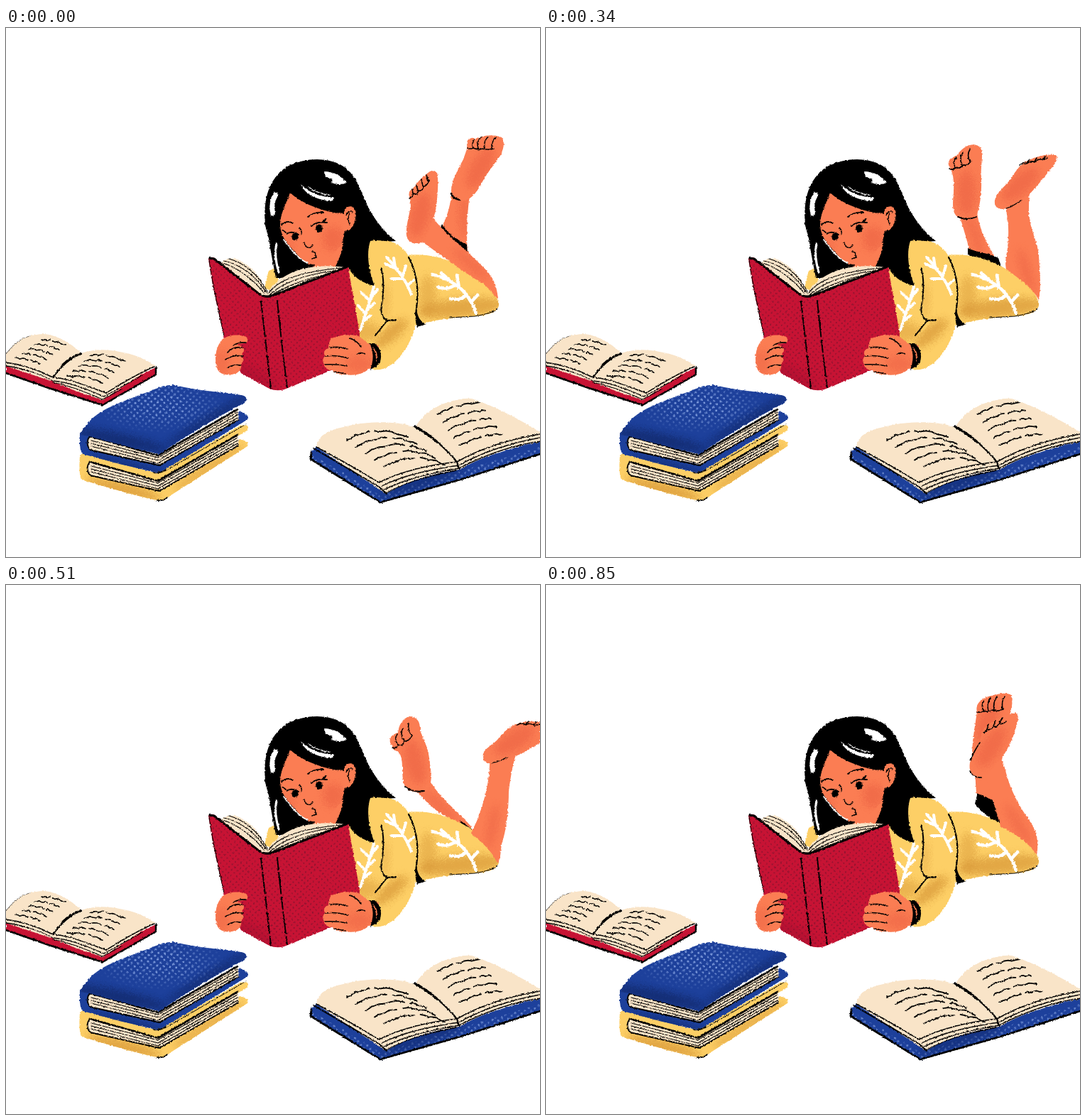
Animation of 752 by 745 pixels, one loop 1020 ms. Source, as an HTML page:

```html
<!DOCTYPE html>
<html lang="en">
<head>
<meta charset="utf-8">
<title>Reading</title>
<style>
html, body { margin: 0; width: 100%; height: 100%; overflow: hidden; background: #fff; }
svg { display: block; width: 752px; height: 745px; }
</style>
</head>
<body>
<svg id="stage" viewBox="0 0 752 745" xmlns="http://www.w3.org/2000/svg"></svg>
<script>
const SKIN = '#fb7d53', BLUSH = '#e95f42', RED = '#c71334', BLUE = '#1d409b',
  YELLOW = '#fdcf66', OCHRE = '#d99a3a', CREAM = '#f9e4c8', INK = '#000', WHITE = '#fff';
let clips = 0;

const fill = (d, c) => `<path d="${d}" fill="${c}"/>`;
const line = (d, w = 2, c = INK) =>
  `<path d="${d}" fill="none" stroke="${c}" stroke-width="${w}" stroke-linecap="round" stroke-linejoin="round"/>`;
const soft = (x, y, rx, ry, c, o = .6, turn = 0) =>
  `<ellipse cx="${x}" cy="${y}" rx="${rx}" ry="${ry}" fill="${c}" opacity="${o}" transform="rotate(${turn} ${x} ${y})" filter="url(#spray)"/>`;
// A flat shape with shading kept inside its outline.
const shape = (d, c, inner) => {
  const id = 'c' + clips++;
  return `<clipPath id="${id}"><path d="${d}"/></clipPath>${fill(d, c)}<g clip-path="url(#${id})">${inner}</g>`;
};
const dots = (id, size, r, c) =>
  `<pattern id="${id}" width="${size}" height="${size}" patternUnits="userSpaceOnUse" patternTransform="rotate(6)">
  <g fill="${c}"><circle cx="${size / 4}" cy="${size / 4}" r="${r}"/><circle cx="${size * .75}" cy="${size * .75}" r="${r}"/></g></pattern>`;
// Rows of handwritten dashes that follow the bulge of a page.
const rows = (n, x, y, sx, sy, dx, dy, bow, w) => {
  let d = '';
  for (let i = 0; i < n; i++) {
    const cut = .36 + .14 * (i % 3);
    for (const [s, e] of [[0, cut], [cut + .1, 1]]) {
      for (let k = 0; k <= 6; k++) {
        const t = s + (e - s) * k / 6;
        const px = x + sx * i + dx * t;
        const py = y + sy * i + dy * t - bow * 4 * t * (1 - t) + Math.sin(k * 1.9 + i);
        d += `${k ? 'L' : 'M'}${px.toFixed(1)},${py.toFixed(1)}`;
      }
    }
  }
  return line(d, w);
};

const noise = f => `<feTurbulence type="fractalNoise" baseFrequency="${f}" numOctaves="2" seed="4" result="n"/>`;
const defs = `<defs>
<filter id="spray" x="-50%" y="-50%" width="200%" height="200%" color-interpolation-filters="sRGB">
  <feGaussianBlur stdDeviation="5" result="b"/>${noise(.7)}
  <feDisplacementMap in="b" in2="n" scale="22" xChannelSelector="R" yChannelSelector="G"/></filter>
<filter id="pencil" filterUnits="userSpaceOnUse" x="-10" y="-10" width="772" height="765" color-interpolation-filters="sRGB">
  ${noise(.35)}<feDisplacementMap in="SourceGraphic" in2="n" scale="3" xChannelSelector="R" yChannelSelector="G"/></filter>
${dots('redDots', 8, 1.15, '#93122f')}${dots('blueDots', 9, 1.5, '#7e9bdc')}
<radialGradient id="fade"><stop offset=".35" stop-color="#fff"/><stop offset="1" stop-color="#000"/></radialGradient>
<mask id="dotFade"><ellipse cx="215" cy="531" rx="95" ry="40" fill="url(#fade)"/></mask></defs>`;

function smallBook() {
  const left = 'M0,459C10,446 20,437 33,434C45,431 55,429 68,434C84,440 96,448 106,458C90,465 76,478 66,492C50,484 25,474 0,471Z';
  const right = 'M106,458C122,452 142,452 160,456C178,459 196,465 210,476C188,485 164,500 141,514C115,505 92,494 66,491C76,478 90,465 106,458Z';
  return fill('M0,471L66,492L141,512L211,478L211,489L136,531L120,527L0,486Z', RED) +
    fill('M0,465L66,480L141,500L209,476L136,524L100,512L66,498L0,476Z', CREAM) +
    line('M0,486L60,507L136,531L211,488V478', 2.5) +
    fill(left, CREAM) + fill(right, CREAM) +
    line('M0,471C25,474 50,484 66,492C92,494 115,505 141,514C164,500 188,485 209,477', 1.5) +
    line('M0,476C24,479 50,488 66,497C92,499 114,509 138,519L192,489', 1.3) +
    line('M66,499C92,504 112,513 136,523L162,509', 1.2) +
    line('M0,459C10,446 20,437 33,434', .6) +
    line('M106,458C90,465 76,478 66,492', 2.4) + line('M105,459Q92,463 80,474', 3) +
    rows(5, 50, 439, -9, 6.5, 34, 8, 2, 1.5) + rows(5, 118, 461, -8, 7.5, 50, 9, 4, 1.5);
}

function stack() {
  const top = 'M104,573C113,556 124,546 140,537C160,527 185,518 204,511C218,505 228,502 239,503C268,511 302,512 331,517C338,518 341,522 336,528C300,546 258,572 216,600C180,592 145,583 118,575Z';
  const under = 'M104,570C104,584 103,594 108,600L160,614L207,625Q216,627 222,623L341,551Q342,543 329,540L214,606L118,572Z';
  const gold = 'M104,602C103,616 103,628 106,636C140,646 180,658 212,665Q220,666 226,662L340,589Q343,582 329,579L214,642L118,608Z';
  const pages = y => {
    const d = `M118,${574 + y}L214,${602 + y}L326,${537 + y}L328,${552 + y}L218,${615 + y}L119,${594 + y}Q110,${584 + y} 118,${574 + y}Z`;
    return fill(d, CREAM) +
      line(`M118,${575 + y}Q111,${584 + y} 118,${594 + y}L216,${616 + y}L327,${552 + y}`, 2) +
      line([5, 9, 13].map(k => `M120,${576 + y + k}L214,${600 + y + k}L326,${536 + y + k}`).join(''), 1.1) +
      line(`M118,${575 + y}L165,${588 + y}L214,${602 + y}L326,${537 + y}`, 2.8);
  };
  return shape(gold, YELLOW, soft(165, 650, 55, 9, OCHRE, .8, 14) + soft(285, 620, 60, 7, OCHRE, .6, -32)) +
    fill('M104,605Q103,598 112,600L212,627L330,560Q342,557 341,566L215,641L106,616Z', YELLOW) +
    pages(36) + line('M224,624L338,558', 1) +
    shape(under, BLUE, soft(175, 620, 60, 7, '#112a70', .7, 14)) + pages(0) +
    shape(top, BLUE, soft(160, 580, 70, 9, '#12296c', .8, 12) + soft(285, 553, 70, 7, '#12296c', .7, -31) +
      `<rect x="100" y="480" width="245" height="110" fill="url(#blueDots)" mask="url(#dotFade)"/>`) +
    line('M207,626Q217,628 225,622M213,665Q220,667 227,661', 1.6);
}

function bigBook() {
  const cover = 'M430,596L437,590L533,646L640,615L752,580L752,601L640,636L527,669L429,608Z';
  const left = 'M437,590C440,574 452,567 475,562C505,554 545,552 577,562C599,574 619,592 635,611C597,615 560,623 525,640C496,622 465,605 437,590Z';
  const right = 'M577,561C586,545 603,533 622,527C635,523 647,521 656,522C690,533 722,551 752,569V572C710,579 670,591 636,611C617,590 599,574 577,561Z';
  return shape(cover, BLUE, '<path d="M430,600L527,658L752,590V605L527,672L425,610Z" fill="url(#blueDots)" opacity=".75"/>' +
      soft(585, 640, 65, 7, '#112a70', .7, -18)) +
    line('M430,598L429,607L527,668L640,636L752,600', 2.8) +
    fill('M437,590L525,620L635,595L752,568V583C712,590 676,601 638,622C598,628 568,637 535,656Z', CREAM) +
    fill(left, CREAM) + fill(right, CREAM) +
    line('M437,590C465,605 496,622 525,640C560,623 597,615 635,611C670,591 710,579 752,572', 1.6) +
    line('M529,645C562,629 598,622 637,616C672,597 712,584 752,577', 1.3) +
    line('M533,650C565,634 600,626 638,620C675,601 712,588 752,582', 1.3) +
    line('M535,655C566,638 600,630 634,623', 1.3) +
    line('M433,592L525,646L536,656', 2) +
    line('M577,562C599,574 619,592 635,611L638,621', 2.4) + line('M576,561Q593,571 606,582', 3.4) +
    rows(5, 480, 580, 13, 9.5, 86, -3, 11, 1.8) +
    rows(5, 607, 544, 8, 11, 60, -16, 4, 1.8);
}

const foot = (d, x, y, turn) => shape(d, SKIN, soft(x, y, 13, 32, BLUSH, .55, turn));
const calf = (d, x, y, turn) => shape(d, SKIN, soft(x, y, 7, 32, BLUSH, .45, turn));
const toes = d => line(d, 1.6);

// Each pose: far leg (behind the dress) and near leg (over it).
const poses = [
  {
    far: calf('M628,232C625,254 620,268 614,280L650,323C649,298 648,268 653,236Z', 645, 262, 0) +
      fill('M614,276C622,289 636,299 649,305L650,321C635,312 620,298 611,284Z', INK) +
      foot('M627,232C626,218 636,200 644,185C647,176 650,170 649,163C649,156 655,153 661,156C672,150 690,150 698,154C703,160 701,170 696,180C685,195 676,206 668,222C660,236 650,246 638,242Q629,240 627,232Z', 668, 197, 30) +
      toes('M650,169Q654,171 658,169Q665,172 671,170Q680,172 687,170M658,169Q655,162 660,157M665,169Q662,160 669,154M674,169Q672,160 679,153M684,169Q684,158 690,154') +
      line('M627,233Q630,241 639,242', 2.6),
    near: calf('M598,262C612,285 640,305 660,325C678,343 690,350 693,381C688,380 684,370 672,360C650,348 620,325 586,301Z', 655, 332, -48) +
      foot('M568,237C566,230 570,228 575,224C580,215 590,207 597,202C604,199 609,204 608,212C609,225 607,240 606,252C603,268 597,283 590,298C585,306 570,306 565,296C561,285 568,265 570,250Z', 583, 263, 14) +
      toes('M568,240Q572,238 574,233Q579,236 581,229Q586,231 588,223Q593,223 596,214M573,233L572,227M580,229L578,222M587,223L585,213M595,216L592,207')
  },
  {
    far: fill('M605,272L607,296L604,308C612,318 625,330 641,339C634,315 624,290 618,270Z', INK) +
      fill('M604,262L606,293L632,304L622,262Z', SKIN) +
      foot('M607,178C604,168 612,162 620,158C632,154 648,150 655,155C658,162 656,172 654,180L640,208L618,238L600,242C600,220 604,200 607,178Z', 622, 192, 20) +
      toes('M608,179Q613,180 617,177Q623,180 629,176Q636,179 643,175M616,177Q612,169 617,163M623,177Q620,167 626,159M631,176Q629,166 635,157M643,175Q641,163 646,157'),
    near: calf('M618,266C625,290 633,315 640,340C660,350 680,362 691,381C695,362 690,345 683,335C665,310 655,290 648,265C645,252 642,246 640,236Z', 665, 337, -32) +
      foot('M660,180C667,182 665,190 662,200C657,220 648,235 640,246C630,255 625,268 612,272C600,272 595,262 597,250C603,232 611,224 613,210C618,195 640,185 660,180Z', 627, 228, 32) +
      toes('M598,247Q602,235 611,222M616,208Q620,207 621,203Q627,205 630,199Q635,201 638,195Q643,197 648,192M621,203L623,196M630,199L633,191M638,195L643,187') +
      line('M597,262Q602,272 613,271', 1.6)
  },
  {
    far: calf('M582,262C588,285 594,300 596,314L642,342C630,315 612,295 607,260Z', 604, 291, -18) +
      fill('M594,310C606,316 625,317 637,324L643,341C625,337 605,327 594,319Z', INK) +
      foot('M567,193C565,185 572,182 578,180C584,172 590,165 602,164C612,165 615,172 614,180C614,190 612,200 613,212C614,235 610,255 606,265C598,272 585,270 579,266C571,258 573,245 574,232C575,215 573,205 570,200Z', 592, 232, 0) +
      toes('M568,198Q574,201 577,196Q583,199 587,193Q594,194 598,188M576,196Q572,188 578,182M586,193Q581,183 587,176M597,188Q592,179 597,171') +
      line('M580,266Q592,272 606,266', 1.8),
    near: calf('M646,248C652,270 652,290 650,310C648,322 646,330 648,340C665,352 685,365 694,383C698,360 695,345 694,320C692,300 682,285 680,262C680,250 680,245 681,228Z', 676, 342, -18) +
      foot('M632,243C634,232 645,225 655,212C662,200 668,192 678,187C690,180 708,177 718,179C722,183 718,190 712,197C702,210 692,222 680,235C668,243 655,250 645,255C635,256 631,250 632,243Z', 668, 220, 48) +
      toes('M667,193Q672,189 677,191Q683,186 688,189Q694,183 700,186L706,183M677,190L681,185M688,188L691,183M700,185L703,181') +
      line('M648,254Q658,251 670,242', 1.2)
  },
  {
    far: calf('M577,288C590,305 605,318 618,325L656,350L656,341C635,318 612,300 598,278Z', 612, 312, -48) +
      fill('M639,331L656,344L657,353L646,347Z', INK) +
      foot('M541,222C539,214 545,210 552,208C553,198 558,188 568,185C578,185 584,192 583,205C590,220 596,235 597,252C600,270 600,285 590,291C578,294 564,290 560,280C557,265 559,255 557,245C556,238 552,234 546,232Z', 576, 250, -13) +
      toes('M544,229Q550,231 552,225Q559,228 561,220Q568,220 572,212M552,225Q546,217 551,210M561,220Q554,210 559,202M572,212Q565,205 567,195') +
      line('M562,284Q574,293 589,290', 1.8),
    near: calf('M681,246C682,275 672,310 664,330C660,340 656,345 655,350C670,362 685,375 692,392C697,385 696,378 698,365C705,345 708,315 708,290C711,268 714,250 719,236Z', 685, 340, 10) +
      foot('M672,242C670,232 682,228 692,218C700,208 708,200 718,196C732,190 745,193 752,193V222C742,228 732,235 720,240C708,246 695,252 682,252C675,250 672,248 672,242Z', 716, 219, 58) +
      toes('M720,197Q727,193 732,197Q738,193 744,198L752,196M732,196L736,192M743,197L747,193') +
      line('M684,251Q696,248 706,243', 1.2)
  }
];

function dress() {
  const skirt = 'M562,320C590,317 615,322 640,335C662,347 688,362 694,388C694,397 686,402 672,405C640,407 610,409 585,417L574,420Z';
  return shape(skirt, YELLOW, soft(640, 394, 62, 13, OCHRE, .75, -5) + soft(594, 378, 12, 30, OCHRE, .5)) +
    line('M692,396Q684,402 660,406L625,408', 1) +
    line('M600,347C615,350 640,362 650,378C656,387 660,394 662,402M624,355L613,345M638,366L635,348M632,362C624,368 616,367 608,365M648,376C640,384 634,383 626,381M655,386L664,376', 4.6, WHITE);
}

function body() {
  const chest = 'M478,332L500,300L518,296L575,330L580,417L540,430L515,450L494,440L480,335Z';
  const arm = 'M512,298C532,294 552,302 562,314C576,332 580,360 579,392C580,420 570,446 552,466C540,478 528,484 515,480L511,446C522,436 535,424 541,414C531,410 527,400 529,388C530,370 530,350 526,335C520,325 514,314 512,298Z';
  return fill('M386,335L370,342L364,366L380,374Z', YELLOW) +
    shape(chest, YELLOW, soft(505, 428, 24, 14, OCHRE, .5)) +
    line('M518,364C514,382 506,402 499,426M514,380L523,368M512,384L500,372M508,398L518,388M506,402L496,391M502,414L513,405', 4, WHITE) +
    shape(arm, YELLOW, soft(542, 430, 30, 10, OCHRE, .75, -40) + soft(534, 385, 6, 25, OCHRE, .35)) +
    line('M528,338C533,354 532,372 529,390Q526,406 537,412L549,411M536,413L520,433', 2) +
    line('M567,323C577,342 581,362 579,386L577,404', 2.2) +
    fill('M578,396C580,408 584,414 592,417L579,421C576,414 576,404 578,396Z', INK) +
    line('M536,323C547,334 562,352 571,375M548,337L546,324M558,352L563,335M549,339L534,332M558,353L543,353M565,363L574,355', 4, WHITE);
}

function head() {
  const hair = 'M365,278C362,240 370,212 396,195C420,183 448,182 468,191C490,201 498,224 505,241C514,264 530,285 549,300C537,302 524,297 513,300C507,318 511,342 519,363C506,361 489,352 482,337L470,335L430,352L380,352C376,330 372,312 370,296Z';
  const face = 'M400,232C394,248 386,262 386,278C387,291 393,300 402,310C411,321 421,332 432,333C446,332 459,322 469,309C474,302 477,292 477,280L476,262C453,260 420,250 400,232Z';
  return fill(hair, INK) +
    fill('M446,320L474,302L472,346L432,350L434,332Z', SKIN) +
    fill('M476,300L479,338L462,340C470,324 474,312 476,300Z', INK) +
    shape(face, SKIN, soft(461, 297, 15, 17, BLUSH, .55) + soft(399, 306, 8, 9, BLUSH, .35)) +
    line('M391,298C400,311 412,326 425,331', 1.8, WHITE) +
    fill('M476,259C478,250 489,248 492,257C494,267 490,280 483,285L475,286Z', SKIN) +
    line('M479,263Q484,255 488,259M484,261Q480,270 484,276', 1.5) +
    line('M388,277Q396,270 404,275M425,266Q435,258 447,260', 1.8) +
    line('M395,290Q402,285 412,291M394,288L390,285M430,279Q438,272 452,274M446,273L451,269', 1.9) +
    '<ellipse cx="407" cy="294" rx="4.6" ry="5.2"/><ellipse cx="441" cy="282" rx="4.8" ry="5.6"/>' +
    line('M413,281Q417,285 416,290M420,302Q421,309 426,309Q431,310 432,305', 1.5) +
    line('M431,315Q438,316 435,320Q440,323 431,325', 1.6) +
    fill('M378,231C371,240 370,253 373,264Q378,266 379,260C377,250 379,242 384,235Z', WHITE) +
    fill('M448,202C460,202 472,207 480,218Q470,222 457,218L460,214L450,209Z', WHITE) +
    fill('M415,220C426,232 444,238 462,239Q462,245 452,243C436,241 421,234 415,220Z', WHITE) +
    line('M381,304C378,316 380,330 384,344', 3.2, WHITE) +
    line('M426,224Q440,234 456,235', 1.3, WHITE);
}

function readingBook() {
  const cover = 'M285,325Q287,321 294,324L358,374Q365,379 374,377L482,335C485,360 494,400 498,433C490,452 474,470 458,482L392,509Q381,512 371,508L331,486L308,440C300,402 290,364 285,325Z';
  return fill('M303,331C307,325 317,323 326,326C345,334 361,352 368,373C378,357 396,345 418,339C435,335 458,334 477,337L374,379L355,374Z', CREAM) +
    line('M304,331C326,336 350,356 364,374M307,328C332,333 354,352 367,373M314,325C336,331 356,348 368,371', 1.2) +
    line('M369,374C382,356 410,344 470,338M371,376C388,360 415,348 462,342M372,377C392,366 416,354 450,348', 1.2) +
    shape(cover, RED, `<path d="${cover}" fill="url(#redDots)"/>` + soft(345, 488, 40, 10, '#9d1030', .4, 28)) +
    line('M287,324L293,325L357,375Q365,380 375,377L481,336', 3) +
    line('M286,326C291,362 300,402 307,433', 1) +
    `<g stroke-dasharray="17 4 30 5">${line('M359,384Q366,445 373,507M382,384Q388,445 396,506', 1.9)}</g>`;
}

function hands() {
  const left = 'M304,439C312,432 326,431 337,434Q343,438 339,443L324,446Q336,448 335,455L332,460Q337,467 331,474Q333,481 325,486C314,490 302,489 298,481C293,469 294,451 304,439Z';
  const right = 'M458,437C470,432 486,431 497,434L510,444L525,447L524,474L511,480C502,488 490,490 476,488Q462,488 460,482Q448,480 448,474Q444,467 449,462Q445,454 454,451Q454,443 458,437Z';
  return shape(left, SKIN, soft(304, 472, 11, 18, BLUSH, .4)) +
    line('M338,443Q328,442 320,447M334,450Q319,448 312,457M334,462Q319,460 309,467M331,475Q321,473 313,478', 1.6) +
    shape(right, SKIN, soft(497, 473, 18, 12, BLUSH, .45)) +
    line('M456,450Q470,448 480,452M450,462Q466,460 481,465M449,474Q464,473 480,476M462,484L478,487M484,437Q494,440 500,449M494,459Q500,456 506,459', 1.6) +
    fill('M512,444L519,444C529,452 531,466 524,475L513,481C518,468 518,456 512,444Z', INK) +
    fill('M516,450Q526,456 521,470Q522,459 516,450Z', SKIN);
}

const group = key => poses.map(p => `<g class="${key}">${p[key]}</g>`).join('');
const stage = document.getElementById('stage');
stage.innerHTML = defs + '<g filter="url(#pencil)">' + group('far') + dress() + group('near') + body() + head() +
  readingBook() + hands() + smallBook() + stack() + bigBook() + '</g>';

const legs = ['far', 'near'].map(k => [...stage.querySelectorAll('.' + k)]);
const STEP = 170, SWING = 6;
let shown = -1;
function draw(t) {
  const k = Math.floor(t / STEP) % SWING, pose = Math.min(k, SWING - k);
  if (pose !== shown) {
    shown = pose;
    for (const set of legs) set.forEach((g, i) => g.style.display = i === pose ? '' : 'none');
  }
}
draw(0);
let start;
function tick(now) {
  start ??= now;
  draw(now - start);
  requestAnimationFrame(tick);
}
requestAnimationFrame(tick);
</script>
</body>
</html>
```
